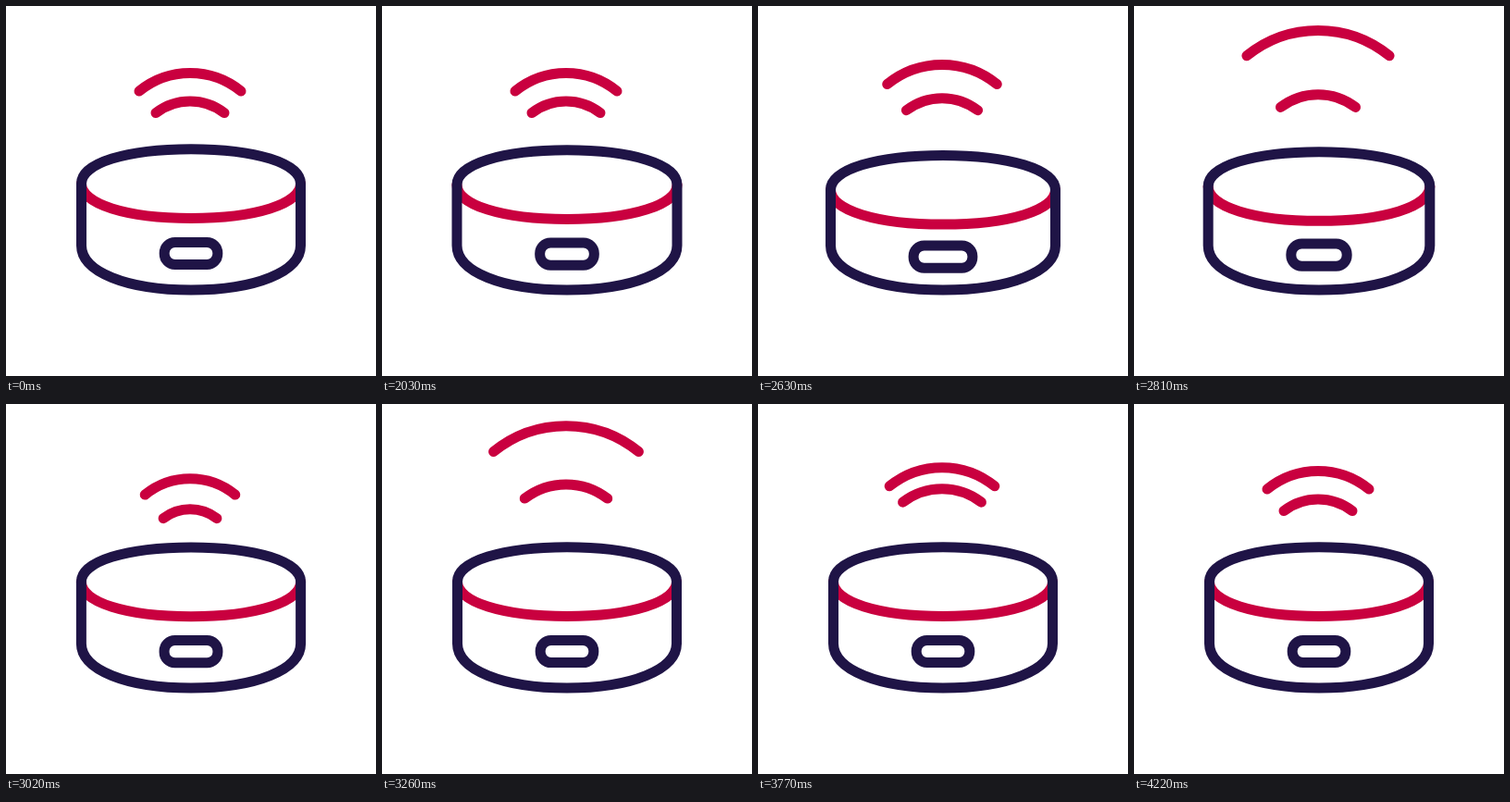
An HTML page for the animation above (4.28 s loop, 400 by 400 pixels).

```html
<!DOCTYPE html>
<html lang="en">
<head>
<meta charset="utf-8">
<title>Smart speaker</title>
<style>
  html, body { margin: 0; width: 100%; height: 100%; overflow: hidden; background: #fff; }
  svg { display: block; width: 100%; height: 100%; }
  path, rect { fill: none; stroke-width: 11; stroke-linecap: round; stroke-linejoin: round; }
  .red { stroke: #c9003f; }
  .navy { stroke: #1f1446; }
</style>
</head>
<body>
<svg viewBox="0 0 400 400">
  <path id="outer" class="red"/>
  <path id="inner" class="red"/>
  <path id="rim" class="red"/>
  <path id="shell" class="navy"/>
  <rect id="slot" class="navy" rx="11.5"/>
</svg>
<script>
const LOOP = 4280, START = 2030, SETTLED = 4200, STEP = 30, CYCLES = 3;
const SQUASH = { start: 1996, period: 252, count: 6, depth: 6.7 };

// Each wave bobs about `mid`; its cycles slow down and its swing grows.
const OUTER = { rest: 72.5, mid: 51.7, swing: 29, growth: 6, start: 2130, period: 410, slow: 10, half: 55, bend: 0.355 };
const INNER = { rest: 103, mid: 102, swing: 11, growth: 10, start: 2105, period: 377, slow: 26, half: 37, bend: 0.34 };

const $ = id => document.getElementById(id);
const [outer, inner, rim, shell, slot] = ['outer', 'inner', 'rim', 'shell', 'slot'].map($);

// Solves t = start + period * n + slow * n² for the cycle count n.
function cycleAt(w, t) {
  return (Math.sqrt(w.period ** 2 + 4 * w.slow * (t - w.start)) - w.period) / (2 * w.slow);
}

function apexAt(w, t) {
  if (t <= START || t >= SETTLED) return w.rest;
  if (t < w.start) {
    const p = (t - START) / (w.start - START);
    return w.rest + (w.mid + w.swing - w.rest) * Math.sin(Math.PI * p / 2) ** 2;
  }
  const n = cycleAt(w, t), c = Math.cos(2 * Math.PI * n);
  if (n < CYCLES) return w.mid + (w.swing + w.growth * (n / CYCLES) ** 2) * c;
  const from = w.start + w.period * CYCLES + w.slow * CYCLES ** 2;
  const fade = (SETTLED - t) / (SETTLED - from);
  return w.rest + (w.mid + w.swing + w.growth - w.rest) * fade * c;
}

function drawWave(el, w, t) {
  const y = apexAt(w, t), rise = w.rest - y;
  const half = w.half + rise * (rise < 0 ? 0.75 : 0.48);
  const sag = half * w.bend, r = (half * half + sag * sag) / (2 * sag);
  el.setAttribute('d', `M${199 - half} ${y + sag}A${r} ${r} 0 0 1 ${199 + half} ${y + sag}`);
}

function squashAt(t) {
  const p = (t - SQUASH.start) / SQUASH.period;
  if (t < START || p > SQUASH.count) return 0;
  return SQUASH.depth * Math.sin(Math.PI * p) ** 2;
}

// Slightly squared half ellipse; a negative rx runs right to left.
function bow(rx, y, ry) {
  const k = 0.59;
  return `C${200 - rx} ${y + ry * k} ${200 - rx * k} ${y + ry} 200 ${y + ry}` +
    `S${200 + rx} ${y + ry * k} ${200 + rx} ${y}`;
}

function drawBody(s) {
  const rx = 118.5 + s * 0.45, y = 192 + s, left = `M${200 - rx} ${y}`;
  shell.setAttribute('d', left + bow(rx, y, -37.3) + 'V259' + bow(-rx, 259, 48) + 'Z');
  rim.setAttribute('d', left + bow(rx, y, 37.4));
  const w = 28.8 + s * 0.46;
  slot.setAttribute('x', 200 - w);
  slot.setAttribute('y', 255.4 + s * 0.53);
  slot.setAttribute('width', 2 * w);
  slot.setAttribute('height', 24.2);
}

function render(now) {
  let t = now % LOOP;
  t = t < START ? 0 : START + Math.floor((t - START) / STEP) * STEP;
  drawWave(outer, OUTER, t);
  drawWave(inner, INNER, t);
  drawBody(squashAt(t));
}

const t0 = performance.now();
function tick() {
  render(performance.now() - t0);
  requestAnimationFrame(tick);
}
tick();
</script>
</body>
</html>
```
